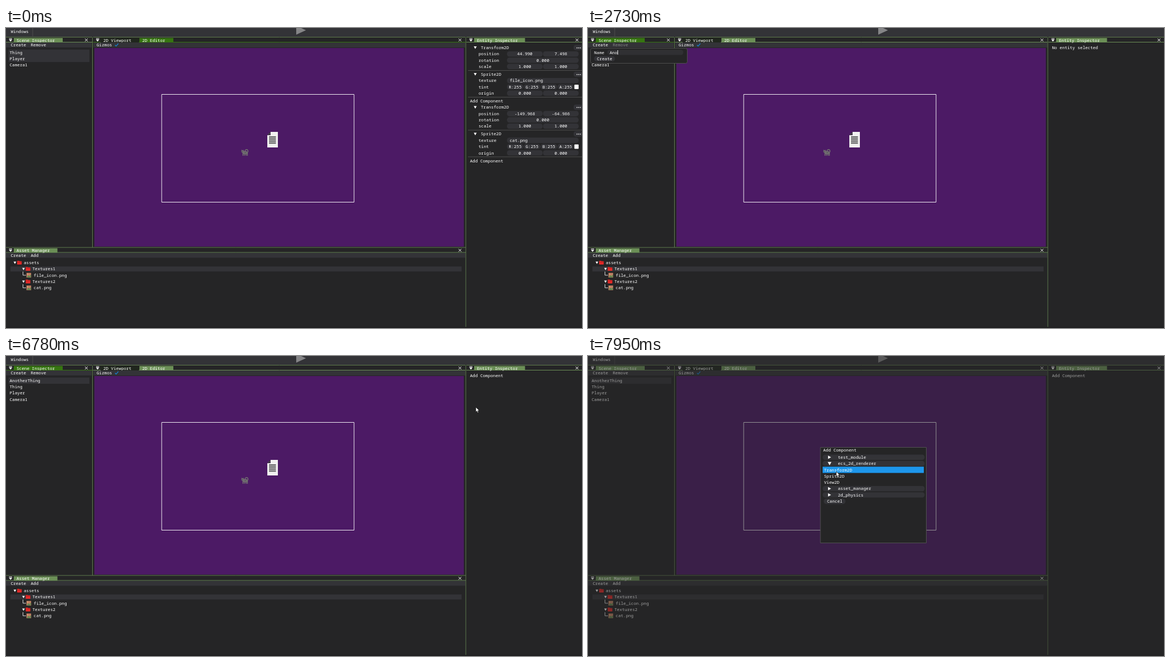
Write an HTML page with a canvas that moves like this. It is 1036 px wide and 540 px high and loops after 8000 ms.

```html
<!DOCTYPE html>
<html lang="en">
<head>
<meta charset="utf-8">
<title>Scene editor</title>
<style>
html, body { margin: 0; width: 100%; height: 100%; overflow: hidden; background: #252526; }
canvas { display: block; width: 1036px; height: 540px; }
</style>
</head>
<body>
<canvas id="stage" width="1036" height="540"></canvas>
<script>
const g = document.getElementById('stage').getContext('2d');
const LOOP = 8000, FRAME = 77.8;
const BG = '#252526', PANEL = '#333337', HOVER = '#1d97ec', BORDER = '#4e4e4e';
const TAB = '#6b8f56', TAB_FOCUS = '#367511', EDGE = '#5f7b4d';
const ROW = 11.3;

// Pointer path: time, x, y
const PATH = [
  [150, 841, 446], [910, 20, 36], [1160, 15, 31], [1330, 15, 31], [1620, 55, 47],
  [4680, 55, 47], [4900, 30, 54], [5310, 30, 54], [5590, 70, 88], [5860, 70, 88],
  [6070, 40, 62], [6290, 35, 45], [6470, 35, 45], [6690, 800, 106], [6768, 845, 92],
  [7000, 842, 40], [7150, 842, 37], [7500, 842, 37], [7930, 446.5, 208]
];
const CLICKS = [[1320, 1470], [1790, 1950], [5060, 5220], [5600, 5760], [6460, 6620], [7160, 7300]];
const KEYSTROKES = [2480, 2640, 2730, 2870, 2960, 3110, 3190, 3420, 3580, 3650, 3810, 3960];

let t = 0, pointer = { x: 0, y: 0 };

const during = (from, to) => t >= from && t < to;
const hovered = (x, y, w, h) =>
  t >= 150 && pointer.x >= x && pointer.x < x + w && pointer.y >= y && pointer.y < y + h;

function pointerAt(time) {
  const q = Math.floor((time + 10) / FRAME) * FRAME;
  const i = PATH.findIndex(k => k[0] > q);
  if (i === 0) return { x: PATH[0][1], y: PATH[0][2] };
  if (i < 0) return { x: PATH.at(-1)[1], y: PATH.at(-1)[2] };
  const [t0, x0, y0] = PATH[i - 1], [t1, x1, y1] = PATH[i];
  const u = (q - t0) / (t1 - t0), e = u * u * (3 - 2 * u);
  return { x: x0 + (x1 - x0) * e, y: y0 + (y1 - y0) * e };
}

function box(x, y, w, h, fill, radius = 0) {
  g.fillStyle = fill;
  g.beginPath();
  g.roundRect(x, y, w, h, radius);
  g.fill();
}
function frame(x, y, w, h, color, radius = 0) {
  g.strokeStyle = color;
  g.lineWidth = 1;
  g.beginPath();
  g.roundRect(x, y, w, h, radius);
  g.stroke();
}
function poly(points, fill) {
  g.fillStyle = fill;
  g.beginPath();
  points.forEach(([x, y]) => g.lineTo(x, y));
  g.closePath();
  g.fill();
}
function line(points, color, width = 1) {
  g.strokeStyle = color;
  g.lineWidth = width;
  g.beginPath();
  points.forEach(([x, y], i) => i ? g.lineTo(x, y) : g.moveTo(x, y));
  g.stroke();
}
function text(s, x, y, color = '#fff', align = 'left') {
  g.font = '7.66px "Noto Sans Mono", "DejaVu Sans Mono", monospace';
  g.fillStyle = color;
  g.textAlign = align;
  g.fillText(s, x, y + 2.7);
}
const arrowDown = (x, y, r = 2.5) => poly([[x - r, y - r * .8], [x + r, y - r * .8], [x, y + r]], '#fff');
const arrowRight = (x, y, r = 3) => poly([[x - r * .8, y - r], [x + r, y], [x - r * .8, y + r]], '#fff');

function tab(label, x, w, y, color) {
  box(x, y + 1, w, 8, color);
  text(label, x + 5, y + 4.8);
}
function titleBar(x, y, w, closeX, color) {
  line([[x, y - .5], [x + w, y - .5]], EDGE);
  line([[x, y + 8.5], [x + w, y + 8.5]], color);
  line([[x + 5.5, y + 2], [x + 11, y + 2]], '#fff');
  poly([[x + 5.2, y + 3.6], [x + 11.3, y + 3.6], [x + 8.2, y + 7.4]], '#fff');
  const cy = y + 4.6;
  line([[closeX - 2.5, cy - 2.5], [closeX + 2.5, cy + 2.5]], '#fff');
  line([[closeX - 2.5, cy + 2.5], [closeX + 2.5, cy - 2.5]], '#fff');
}

function toolbar() {
  box(0, 0, 1036, 16, PANEL);
  text('Windows', 8.5, 6);
  line([[48, 0], [48, 15]], BORDER);
  poly([[522, -4], [539.5, 4], [522, 12]], '#858587');
}

function scenePanel() {
  const color = during(1010, 7310) ? TAB_FOCUS : TAB;
  titleBar(0, 17, 155, 144.5, color);
  tab('Scene Inspector', 14, 88, 17, color);
  box(0, 26, 154, 9, PANEL);
  if (t < 5600 && hovered(4.5, 26, 36, 9.5)) box(4.5, 25.5, 35.5, 9.5, HOVER);
  text('Create', 8.5, 30.4);
  text('Remove', 44.5, 30.4, during(1320, 6460) ? '#858587' : '#fff');

  const names = ['Thing', 'Player', 'Camera1'];
  if (t >= 5140) names.unshift('AnotherThing');
  const selected = t < 1320 ? [0, 1] : t >= 6460 ? [0] : [];
  const open = t >= 5600 && t < 7310 || t < 1320;
  names.forEach((name, i) => {
    const y = 38.7 + i * ROW;
    if (open && hovered(4.5, y, 145, ROW)) box(4.5, y, 145.5, ROW, HOVER);
    else if (selected.includes(i)) box(4.5, y, 145.5, ROW, PANEL);
    text(name, 6.5, y + 5.2);
  });
}

function viewport() {
  const color = t < 910 ? TAB_FOCUS : TAB;
  titleBar(156.5, 17, 670, 816.5, color);
  tab('2D Viewport', 170, 69, 17, '#20261d');
  tab('2D Editor', 240, 61, 17, color);
  box(157, 26, 669, 9, PANEL);
  text('Gizmos', 163, 30.4);
  line([[196, 30.5], [198, 32.7], [202, 28]], '#1684d8', 1.2);
  box(159, 36, 664.5, 357.5, '#4c1a65');
  frame(280, 119.5, 346, 194, '#f2eef4');

  poly([[475.8, 187], [489, 187], [489, 215], [470, 215], [470, 193], [475.8, 193]], '#f1f1f0');
  poly([[470, 192.6], [475.6, 187], [475.6, 192.6]], '#444346');
  for (let i = 0; i < 6; i++) box(473, 195 + i * 2.4, 12.5, 1.2, '#29292b');
  cat();
}

function cat() {
  const fur = '#706d70';
  g.fillStyle = fur;
  g.beginPath();
  g.ellipse(430.3, 224.5, 4.8, 3, 0, 0, 7);
  g.ellipse(425.8, 222.6, 2.5, 2.2, 0, 0, 7);
  g.fill();
  poly([[423.3, 222], [423.8, 218.8], [425.5, 220.6], [427.3, 219], [428, 222]], fur);
  [425.5, 428, 431, 433.5].forEach(x => box(x, 225, 1.5, 5, fur));
  g.strokeStyle = fur;
  g.lineWidth = 1.5;
  g.beginPath();
  g.arc(432.6, 221.7, 2.8, 2.8, 7);
  g.stroke();
  box(424.5, 222, 1, 1, '#34313a');
  box(429, 224, 3, .8, '#4c4a4f');
}

function folder(label, x, y) {
  arrowDown(x, y, 2.4);
  box(x + 4, y - 3.5, 4, 2, '#d31f1f', .5);
  box(x + 4, y - 2.6, 8.3, 6, '#e52a28', .7);
  box(x + 4, y - 1.4, 8.3, .6, '#9e1919');
  text(label, x + 16, y);
}
function asset(label, y) {
  line([[30.5, y - 6.5], [30.5, y], [36, y]], '#d8d8d8');
  box(36.8, y - 4.2, 8.4, 8.4, '#bd8063');
  poly([[37.5, y + 3.5], [40, y], [42, y + 2], [44.5, y - 1], [44.5, y + 3.5]], '#4e8b4c');
  box(38, y - 3, 2, 2, '#e2a16e', 1);
  text(label, 49.8, y);
}
function assetPanel() {
  titleBar(0, 395.5, 827, 816.5, TAB);
  tab('Asset Manager', 14, 78.5, 395.5, TAB);
  box(0, 404.8, 826, 8.7, PANEL);
  text('Create', 8.5, 409);
  text('Add', 44.5, 409);
  box(8, 429.3, 811.5, 9, PANEL);
  folder('assets', 16, 422.4);
  folder('Textures1', 31.5, 433.7);
  asset('file_icon.png', 445);
  folder('Textures2', 31.5, 456.3);
  asset('cat.png', 467.7);
}

function field(x, w, y, value, left) {
  box(x, y - 4.8, w, 9.6, PANEL, 4.5);
  text(value, left ? x + 5 : x + w / 2, y, '#fff', left ? 'left' : 'center');
}
function pair(label, y, a, b) {
  text(label, 850, y);
  field(901, 64.3, y, a);
  field(965.8, 64.3, y, b);
}
function componentHead(label, y) {
  arrowDown(844, y, 2.6);
  text(label, 854, y);
  box(1021, y - 4.8, 15, 9.6, PANEL, 4);
  for (let i = 0; i < 3; i++) box(1026.3 + i * 3, y - .3, 1.5, 1.5, '#fff');
}
function entity(y, px, py, texture) {
  const rule = dy => line([[831, y + dy], [1036, y + dy]], BORDER);
  componentHead('Transform2D', y);
  pair('position', y + 11.5, px, py);
  text('rotation', 850, y + 22.8);
  field(901, 129, y + 22.8, '0.000');
  pair('scale', y + 34.1, '1.000', '1.000');
  rule(41.3);
  componentHead('Sprite2D', y + 48);
  text('texture', 850, y + 59.5);
  field(901, 129, y + 59.5, texture, true);
  text('tint', 850, y + 70.8);
  ['R', 'G', 'B', 'A'].forEach((c, i) => field(901 + i * 30.3, 29.5, y + 70.8, c + ':255'));
  box(1022.3, y + 66.8, 7.6, 8, '#fff', 1);
  pair('origin', y + 82.2, '0.000', '0.000');
  rule(89.3);
  text('Add Component', 834.5, y + 96.3);
}
function entityPanel() {
  titleBar(828, 17, 208, 1027, TAB);
  tab('Entity Inspector', 842, 91.5, 17, TAB);
  if (t < 1320) {
    entity(35.2, '44.990', '7.498', 'file_icon.png');
    entity(142.6, '-149.968', '-64.986', 'cat.png');
  } else if (t < 6460) {
    text('No entity selected', 834.5, 35.2);
  } else {
    if (t < 7310 && hovered(832, 30, 200, 10)) box(832, 30, 200, 10, HOVER);
    text('Add Component', 834.5, 35.2);
  }
}

function createPopup() {
  box(4.5, 36.5, 174, 27, BG, 3);
  frame(4.5, 36.5, 174, 27, BORDER, 3);
  text('Name', 11, 44);
  box(34.5, 39.2, 137, 9.4, '#303033', 4.5);
  if (t < 5140) {
    const typed = 'AnotherThing'.slice(0, KEYSTROKES.filter(k => t >= k).length);
    text(typed, 39, 44);
    if (t >= 1790) box(39.3 + typed.length * 4.6, 40, .9, 8, '#fff');
  }
  box(11, 50.4, 37.5, 9.6, hovered(11, 50.4, 37.5, 9.6) ? HOVER : PANEL, 4.5);
  text('Create', 16, 55.2);
}

function componentDialog() {
  const dim = t < 7390 ? .2 : t < 7470 ? .4 : .46;
  box(0, 0, 1036, 540, `rgba(37,37,38,${dim})`);
  box(418, 164.5, 190.5, 172, BG);
  frame(418, 164.5, 190.5, 172, '#515151');
  text('Add Component', 423, 169);
  const rows = ['>test_module', 'vecs_2d_renderer', 'Transform2D', 'Sprite2D', 'View2D',
    '>asset_manager', '>2d_physics'];
  rows.forEach((label, i) => {
    const y = 182.2 + i * ROW, isHover = hovered(422, y - 5.6, 183, ROW);
    if (label[0] === '>' || label[0] === 'v') {
      box(422, y - 4.8, 183.5, 9.6, isHover ? HOVER : PANEL, 4.5);
      label[0] === 'v' ? arrowDown(434.5, y, 3.3) : arrowRight(434.2, y);
      text(label.slice(1), 449.5, y);
    } else {
      if (isHover) box(422, y - 5.6, 182, ROW, HOVER);
      text(label, 424.5, y);
    }
  });
  box(424, 256.8, 39, 9.6, PANEL, 4.5);
  text('Cancel', 430, 261.5);
}

function drawPointer() {
  const { x, y } = pointer;
  if (CLICKS.some(([a, b]) => during(a, b))) {
    g.fillStyle = 'rgba(222,225,25,.7)';
    g.beginPath();
    g.arc(x, y, 7.5, 0, 7);
    g.fill();
  }
  if (t < 150 || during(1950, 4450)) return;
  if (during(1320, 5140) && hovered(34.5, 39, 137, 9.6)) {
    line([[x, y - 3], [x, y + 5]], '#dedede', .9);
    line([[x - 1.8, y - 3.4], [x + 1.8, y - 3.4]], '#dedede', .8);
    line([[x - 1.8, y + 5], [x + 1.8, y + 5]], '#dedede', .8);
    return;
  }
  g.save();
  g.translate(x, y);
  poly([[0, 0], [0, 8.8], [2, 7], [3.4, 10.2], [5, 9.5], [3.6, 6.4], [6.2, 6.2]], '#fff');
  g.strokeStyle = '#111';
  g.lineWidth = .7;
  g.stroke();
  g.restore();
}

function draw() {
  t = performance.now() % LOOP;
  pointer = pointerAt(t);
  box(0, 0, 1036, 540, BG);
  toolbar();
  scenePanel();
  viewport();
  assetPanel();
  entityPanel();
  line([[155.5, 17], [155.5, 395]], EDGE);
  line([[827, 17], [827, 540]], EDGE);
  box(0, 538, 1036, 2, '#1e1e1f');
  if (during(1320, 5600)) createPopup();
  if (t >= 7310) componentDialog();
  drawPointer();
  requestAnimationFrame(draw);
}
draw();
</script>
</body>
</html>
```
